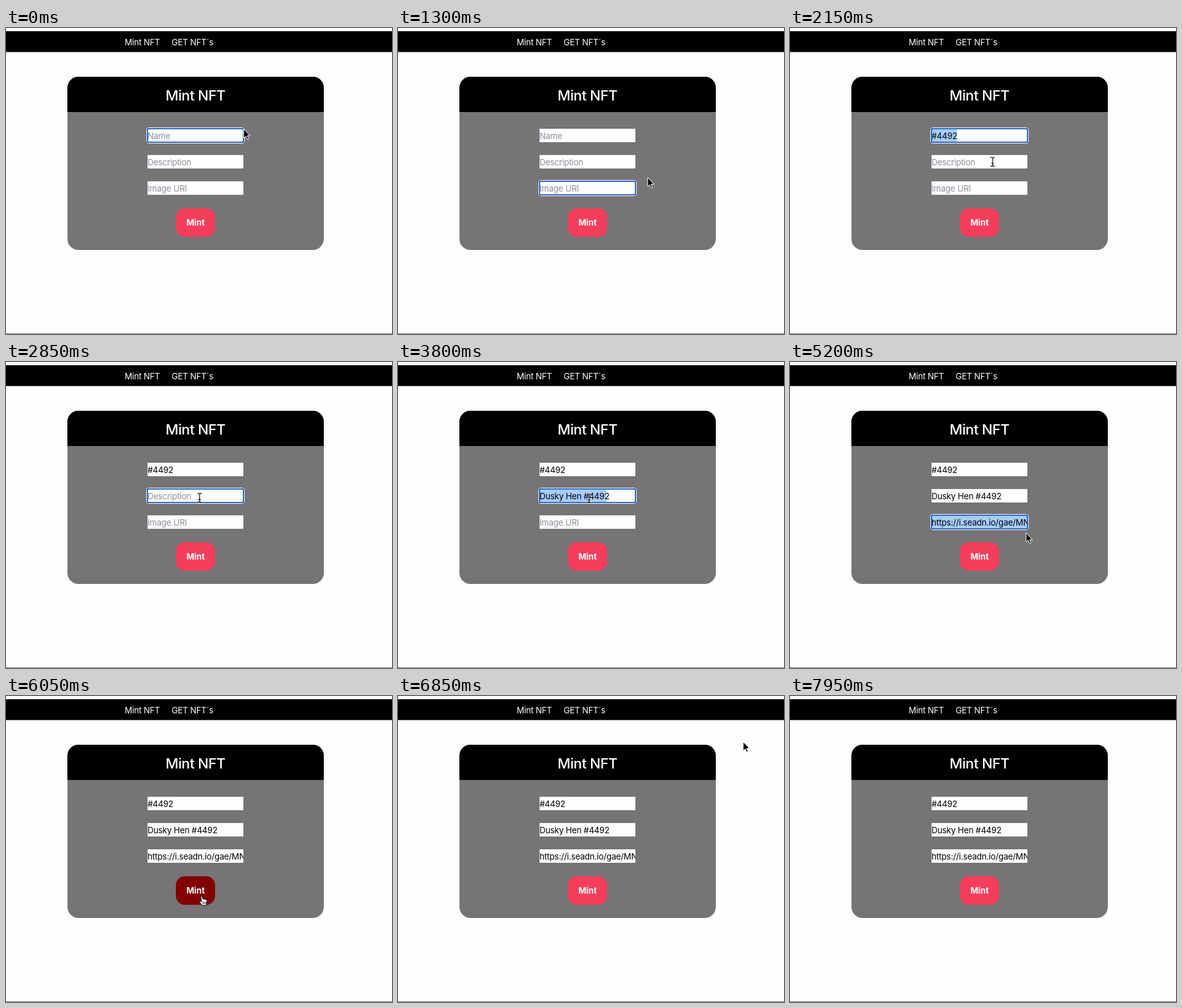
An HTML page for the animation above (8000 ms loop, 600x477 px).

```html
<!DOCTYPE html>
<html lang="en">
<head>
<meta charset="utf-8">
<title>Mint NFT</title>
<style>
html, body { margin: 0; width: 100%; height: 100%; overflow: hidden; background: #fdfcff; }
svg { display: block; }
text { font: 13px Inter, "Open Sans", sans-serif; letter-spacing: -.2px; white-space: pre; }
.light { fill: #fff; }
#title { font-size: 22px; font-weight: 500; letter-spacing: -.4px; }
#label { font-weight: 700; letter-spacing: 0; }
.ring rect { fill: none; }
</style>
</head>
<body>
<svg id="stage" width="600" height="477" viewBox="0 0 600 477">
  <rect width="600" height="477" fill="#fdfcff"/>
  <rect y="5" width="600" height="32.5"/>
  <text class="light" x="184.5" y="27">Mint NFT</text>
  <text class="light" x="257.5" y="27">GET NFT´s</text>
  <rect x="95.5" y="76" width="398.5" height="270" rx="17" fill="#767477"/>
  <path d="M95.5 131V93a17 17 0 0 1 17-17H477a17 17 0 0 1 17 17V131z"/>
  <text id="title" class="light" x="294.5" y="113" text-anchor="middle">Mint NFT</text>
  <g id="fields"></g>
  <rect id="button" x="264" y="281" width="61" height="44.5" rx="14"/>
  <text id="label" class="light" x="294.7" y="308" text-anchor="middle">Mint</text>
  <rect y="476" width="600" height="1" fill="#77767a"/>
  <g id="cursor" stroke-linejoin="round" stroke-linecap="round">
    <path id="arrow" d="M0 0V13.6L3.1 10.8 5.4 15.8 7.6 14.8 5.4 9.9H9.6z" stroke="#fff" stroke-width="1"/>
    <g id="beam" fill="none">
      <path d="M-3-7Q0-7 0-5Q0-7 3-7M0-5V5M-3 7Q0 7 0 5Q0 7 3 7M-1.5 2.5H1.5" stroke="#fff" stroke-opacity=".6" stroke-width="2.4"/>
      <path d="M-3-7Q0-7 0-5Q0-7 3-7M0-5V5M-3 7Q0 7 0 5Q0 7 3 7M-1.5 2.5H1.5" stroke="#000" stroke-width="1.1"/>
    </g>
    <g id="hand">
      <path d="M-1.2 1.2Q0-.4 1.2 1.2L2 5Q3.3 4 4.1 5.4 5.5 4.6 6.3 6 8.3 5.6 8.4 8L7.6 12V14.8H.6L-3.4 9.2Q-3.6 7.2-1.6 8.2L-.2 9.2z" fill="#fff" stroke="#000"/>
      <path d="M2 9.5V12.5M4 9.5V12.5M6 9.5V12.5" stroke="#000" stroke-width=".8"/>
    </g>
  </g>
</svg>
<script>
const LOOP = 8000, STEP = 50;
const $ = id => document.getElementById(id);
const show = (el, on) => el.setAttribute("visibility", on ? "visible" : "hidden");

// Each field is focused from focus[0] to focus[1]; its text arrives selected at fill.
const fields = [
  { y: 157, hint: "Name", value: "#4492", sel: 39.5, fill: 1900, focus: [[0, 850], [1850, 2550]] },
  { y: 198, hint: "Description", value: "Dusky Hen #4492", sel: 104, fill: 3600, focus: [[2550, 4600]] },
  { y: 239, hint: "Image URI", value: "https://i.seadn.io/gae/MNOq", sel: 149, fill: 4850, focus: [[850, 1850], [4600, 5950]] }
];

// Pointer path: time, x, y
const path = [
  [150, 369.5, 158], [400, 362, 205], [650, 345, 250], [950, 345, 250],
  [1300, 388, 233.5], [1650, 388, 233.5], [1850, 340, 170], [1950, 335, 172],
  [2150, 315, 208.5], [2500, 315, 208.5], [3000, 297, 212.5], [4400, 297, 212.5],
  [4600, 310, 248], [4900, 320, 250], [5150, 367, 267], [5300, 367, 267],
  [5900, 304, 311.5], [6150, 304, 311.5], [6950, 547, 61], [7150, 593, 50]
];
const POINTER_GONE = 7500;

for (const f of fields) {
  const g = document.createElementNS("http://www.w3.org/2000/svg", "g");
  g.innerHTML = `
    <svg x="220" y="${f.y}" width="149" height="21">
      <rect width="149" height="21" fill="#fdfcff"/>
      <rect class="sel" y="1" width="${f.sel}" height="19" fill="#a5cdfc"/>
      <text x="0" y="15.5"></text>
    </svg>
    <g class="ring">
      <rect x="218.5" y="${f.y - 1.5}" width="152" height="24" rx="3.5" stroke="#fff"/>
      <rect x="219.8" y="${f.y - .2}" width="149.4" height="21.4" rx="2.5" stroke="#1556b8" stroke-width="1.8"/>
    </g>`;
  $("fields").append(g);
  f.text = g.querySelector("text");
  f.mark = g.querySelector(".sel");
  f.ring = g.querySelector(".ring");
}

function pointer(t) {
  const i = path.findIndex(p => p[0] > t);
  if (i === 0) return path[0].slice(1);
  if (i < 0) return path.at(-1).slice(1);
  const [t0, x0, y0] = path[i - 1], [t1, x1, y1] = path[i];
  const u = (t - t0) / (t1 - t0), e = u * u * (3 - 2 * u);
  return [x0 + (x1 - x0) * e, y0 + (y1 - y0) * e];
}

const inside = (x, y, l, t, w, h) => x >= l && x <= l + w && y >= t && y <= t + h;

function draw(t) {
  for (const f of fields) {
    const filled = t >= f.fill;
    const focused = f.focus.some(([a, b]) => t >= a && t < b);
    f.text.textContent = filled ? f.value : f.hint;
    f.text.setAttribute("fill", filled ? "#000" : "#8e919b");
    show(f.mark, filled && focused);
    show(f.ring, focused);
  }
  const [x, y] = pointer(t);
  const onButton = inside(x, y, 264, 281, 61, 44.5);
  const onField = fields.some(f => inside(x, y, 220, f.y, 149, 21));
  const shown = t < POINTER_GONE;
  $("button").setAttribute("fill", onButton ? "#830000" : "#f43e5c");
  $("cursor").setAttribute("transform", `translate(${x} ${y})`);
  show($("hand"), shown && onButton);
  show($("beam"), shown && onField);
  show($("arrow"), shown && !onButton && !onField);
}

const start = performance.now();
function tick() {
  const t = (performance.now() - start) % LOOP;
  draw(Math.floor(t / STEP) * STEP);
  requestAnimationFrame(tick);
}
tick();
</script>
</body>
</html>
```
